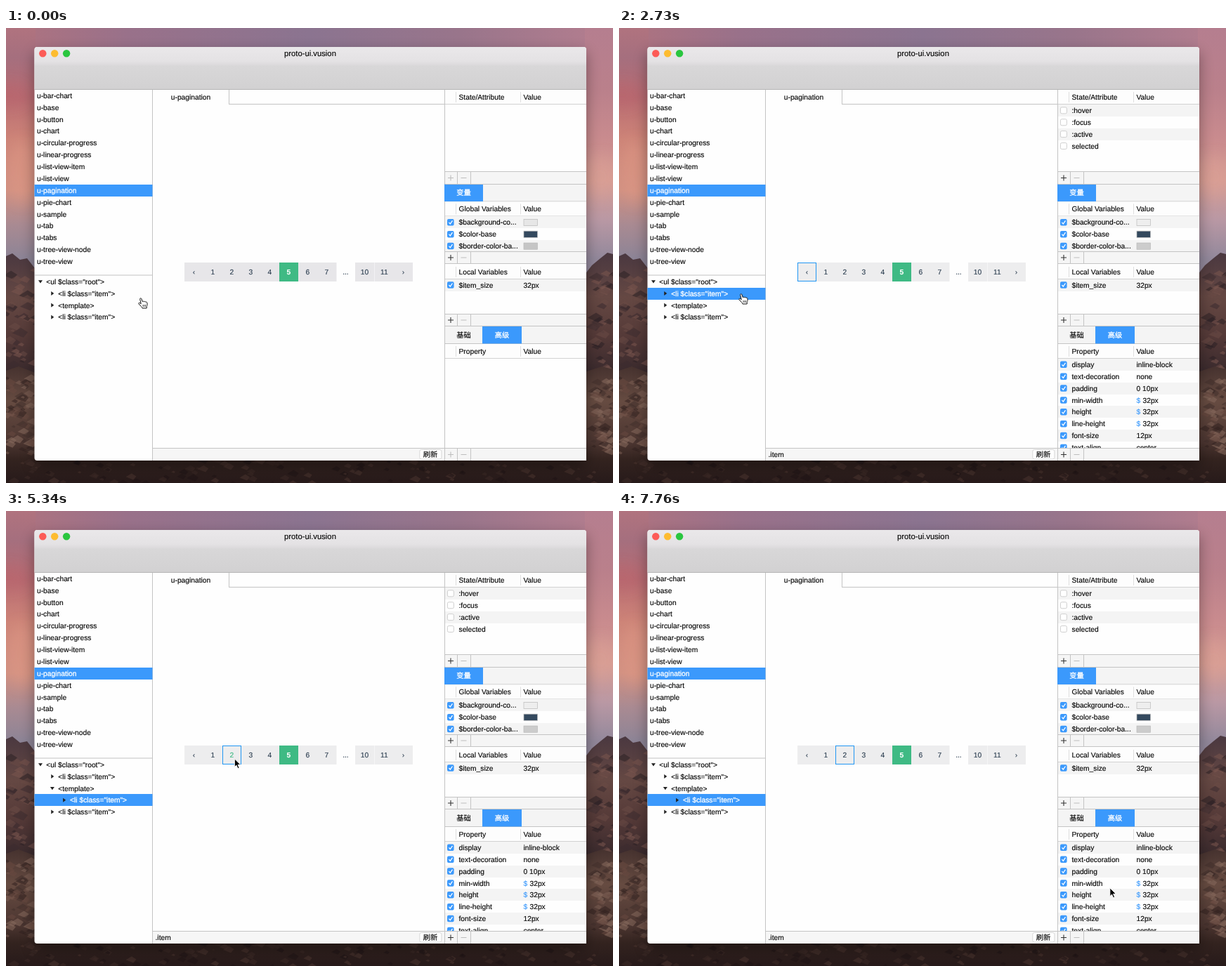
Animation of 864 by 648 pixels, one loop 8 s. Source, as an HTML page:

```html
<!DOCTYPE html>
<html lang="zh">
<head>
<meta charset="utf-8">
<title>proto-ui.vusion</title>
<style>
html, body { margin: 0; width: 100%; height: 100%; overflow: hidden; background: #2a1c1d; }
svg { display: block; width: 864px; height: 648px; }
text {
  font: 10.25px "Liberation Sans", Arial, "Noto Sans CJK SC", "Noto Sans CJK", sans-serif;
  color: #050505; fill: currentColor; stroke: currentColor; stroke-width: .14px;
  white-space: pre; text-rendering: geometricPrecision;
}
.cjk { font-family: "Noto Sans CJK SC", "Noto Sans CJK", sans-serif; font-weight: 500; }
.mid { text-anchor: middle; }
.on { color: #fff; stroke-width: .3px; }
</style>
</head>
<body>
<svg id="stage" viewBox="0 0 864 648" xmlns="http://www.w3.org/2000/svg"></svg>
<script>
const LOOP = 8000, ROW = 16.875;
const BLUE = '#3b99fc', STRIPE = '#f4f4f4', LINE = '#c4c4c4', GREEN = '#3fba84', INK = '#2c3e50';

// ---------- helpers ----------
const esc = s => s.replace(/&/g, '&amp;').replace(/</g, '&lt;');
const rect = (x, y, w, h, fill, extra = '') =>
  `<rect x="${x}" y="${y}" width="${w}" height="${h}" fill="${fill}" ${extra}/>`;
const hline = (x1, x2, y, c = LINE) => rect(x1, y, x2 - x1, 1, c);
const vline = (x, y1, y2, c = LINE) => rect(x, y1, 1, y2 - y1, c);
const path = (d, fill, extra = '') => `<path d="${d}" fill="${fill}" ${extra}/>`;
// y is the middle of the text line
const text = (x, y, s, cls = '', style = '') =>
  `<text x="${x}" y="${y + 3.6}" class="${cls}" style="${style}">${esc(s)}</text>`;
// Row background on whole pixels around the middle y
const band = (x, y, w, fill) => rect(x, Math.round(y - 8.4), w, 17, fill);
const clip = (id, x, y, w, h) => `<clipPath id="${id}">${rect(x, y, w, h, '#000')}</clipPath>`;
const gradient = (id, stops, dir = 'x2="0" y2="1"') =>
  `<linearGradient id="${id}" ${dir}>` +
  stops.map(([o, c]) => `<stop offset="${o}" stop-color="${c}"/>`).join('') + '</linearGradient>';

let seed = 11;
const rand = () => (seed = (seed * 16807) % 2147483647) / 2147483647;

// ---------- desktop ----------
function rocks(n, x, y, w, h, colors, size) {
  let out = '';
  for (let i = 0; i < n; i++) {
    const px = x + rand() * w, py = y + rand() * h, s = size * (.4 + rand());
    const d = `M${px.toFixed(1)} ${py.toFixed(1)}l${s.toFixed(1)} ${(-s * .6).toFixed(1)}` +
      `l${(s * .8).toFixed(1)} ${(s * .5).toFixed(1)}l${(-s * .5).toFixed(1)} ${(s * .6).toFixed(1)}z`;
    out += path(d, colors[i % colors.length], 'opacity=".55"');
  }
  return out;
}

function desktop() {
  const dark = ['#2c2024', '#6a4a45', '#3d2c30', '#7a564e'];
  const boulders = ['#7c5f54', '#32211f', '#68493f', '#42302b', '#866a5d'];
  return rect(0, 0, 864, 60, 'url(#skyTop)') + rect(0, 0, 42, 350, 'url(#skyL)') +
    rect(824, 0, 40, 350, 'url(#skyR)') +
    `<g filter="url(#soft)">
      <ellipse cx="4" cy="95" rx="26" ry="16" fill="#b9636d" opacity=".5"/>
      <ellipse cx="24" cy="205" rx="24" ry="44" fill="#e09a86" opacity=".45"/>
      <ellipse cx="846" cy="212" rx="28" ry="30" fill="#dea396" opacity=".4"/>
    </g>` +
    path('M0 325L9 321L20 330L30 328L44 346V500H0Z', 'url(#peak)') +
    path('M820 356L834 338L846 328L856 320L864 322V500H820Z', 'url(#peak)') +
    rocks(45, -6, 345, 46, 140, dark, 9) + rocks(45, 824, 350, 44, 135, dark, 9) +
    path('M0 488L18 482L44 492L432 500L824 490L848 482L864 486V648H0Z', 'url(#ground)') +
    rocks(70, -6, 498, 48, 110, boulders, 8) + rocks(70, 824, 498, 44, 110, boulders, 8) +
    rocks(130, -6, 616, 876, 34, ['#3d2a27', '#1f1415', '#4a342f'], 7);
}

// ---------- window parts ----------
function toolBar(y, h, enabled) {
  const m = y + h / 2 + .5, end = y + h;
  return rect(625, y, 201, h, '#f5f5f5') + hline(625, 826, y) + (end < 616 ? hline(625, 826, end) : '') +
    vline(642, y, end) + vline(661, y, end) + plus(m, enabled) +
    rect(647.5, m - .5, 8, 1, '#bdbdbd');
}
const plus = (m, enabled) => path(`M629 ${m}h8M633 ${m - 4}v8`, 'none',
  `stroke="${enabled ? '#333' : '#bdbdbd'}" stroke-width="1.1"`);

const header = (y, title) => rect(625, y - 10, 201, 20, '#fdfdfd') + hline(625, 826, y + 10, '#d2d2d2') +
  vline(640, y - 7, y + 8, '#dedede') + vline(732, y - 7, y + 8, '#dedede') +
  text(644.5, y, title) + text(736.5, y, 'Value');

// Tab strip with the chosen tab from x on, w wide
const tabBar = (y, x, w) => rect(625, y, 201, 24, '#f4f4f4') + hline(625, 826, y + 24) +
  rect(x, y, w, 24.5, BLUE);
const tabText = (x, y, s, on) => text(x, y, s, 'cjk mid' + (on ? ' on' : ''));

const check = (y, on) => on
  ? rect(628, y - 4.8, 9.6, 9.6, BLUE, 'rx="2"') +
    path(`M630.4 ${y}l1.9 2.2l3.2 -4.7`, 'none', 'stroke="#fff" stroke-width="1.3"')
  : rect(628.4, y - 4.4, 9, 9, '#fff', 'rx="2" stroke="#cacaca" stroke-width=".9"');

// A value starting with $ shows the sign in blue
function rows(y0, items, checked) {
  return items.map(([name, value = ''], i) => {
    const y = y0 + i * ROW;
    const linked = value[0] === '$';
    return (i % 2 ? '' : band(625, y, 201, STRIPE)) + check(y, checked) +
      text(644.5, y, name) +
      (linked ? text(736.5, y, '$', '', `color:${BLUE}`) + text(745.5, y, value.slice(2)) : text(736.5, y, value));
  }).join('');
}

const parts = ['u-bar-chart', 'u-base', 'u-button', 'u-chart', 'u-circular-progress', 'u-linear-progress',
  'u-list-view-item', 'u-list-view', 'u-pagination', 'u-pie-chart', 'u-sample', 'u-tab', 'u-tabs',
  'u-tree-view-node', 'u-tree-view'];

function frame() {
  const list = parts.map((p, i) => {
    const y = 96.2 + i * ROW, on = p === 'u-pagination';
    return (on ? band(40.5, y, 168, BLUE) : '') + text(44, y, p, on ? 'on' : '');
  }).join('');
  const lights = ['#fc5b57', '#fdbc30', '#2ac63f'].map((c, i) =>
    `<circle cx="${52.3 + 16.9 * i}" cy="36.2" r="5.2" fill="${c}"/>`).join('');
  return rect(40.5, 27, 785.5, 589, '#000', 'rx="4" filter="url(#shadow)" opacity=".36"') +
    rect(40.5, 27, 785.5, 589, '#fefefe', 'rx="4"') +
    path('M40.5 87V31q0 -4 4 -4H822q4 0 4 4V87Z', 'url(#bar)') + hline(40.5, 826, 87, '#b5b5b5') +
    lights + text(433, 36.7, 'proto-ui.vusion', 'mid', 'font-size:11.25px') +
    hline(41, 208, 351.5) + vline(208, 88, 616) + list +
    text(263, 98, 'u-pagination', 'mid') + vline(317, 88, 109) + hline(317, 624, 108) +
    rect(209, 599, 415, 17, '#f6f6f6') + hline(209, 624, 598) +
    rect(588.8, 600.5, 31, 13.5, '#fff', 'rx="2.5" stroke="#d0d0d0" stroke-width=".8"') +
    text(604, 607.4, '刷新', 'cjk mid') + vline(624, 88, 616);
}

function sidebar() {
  return header(98, 'State/Attribute') +
    tabBar(222.5, 624, 55) + tabText(651.5, 234.7, '变量', true) + header(257.4, 'Global Variables') +
    `<g clip-path="url(#cGlobal)">${rows(276.8, [['$background-co...'], ['$color-base'], ['$border-color-ba...']], true)}</g>` +
    '<g id="swatches"></g>' + toolBar(318, 17, true) +
    header(347, 'Local Variables') + rows(366, [['$item_size', '32px']], true) + toolBar(407, 17, true) +
    tabBar(425, 678, 56) + tabText(651.5, 437, '基础', false) + tabText(706, 437, '高级', true) +
    header(460, 'Property');
}

// ---------- changing parts ----------
const states = [[':hover'], [':focus'], [':active'], ['selected']];
const rootProps = [['user-select', 'none'], ['cursor', 'default'], ['padding', '0'], ['margin-bottom', '$ 15px']];
const itemProps = [['display', 'inline-block'], ['text-decoration', 'none'], ['padding', '0 10px'],
  ['min-width', '$ 32px'], ['height', '$ 32px'], ['line-height', '$ 32px'], ['font-size', '12px'],
  ['text-align', 'center']];

const LI = '<li $class="item">';
const tree = [[0, '<ul $class="root">', 1], [1, LI, 0], [1, '<template>', 0], [1, LI, 0]];
const openTree = [tree[0], tree[1], [1, '<template>', 1], [2, LI, 0], tree[3]];

function drawTree(nodes, picked, hover) {
  return nodes.map(([depth, label, open], i) => {
    const y = 361.2 + i * ROW, x = 49 + depth * ROW, on = i === picked;
    const fill = on ? BLUE : i === hover ? STRIPE : '';
    const arrow = open ? `M${x - 3} ${y - 2}h6l-3 4.4z` : `M${x - 1.6} ${y - 3.2}v6l4 -3z`;
    return (fill ? band(40.5, y, 168, fill) : '') +
      path(arrow, '#222') + text(x + 8.3, y, label, on ? 'on' : '');
  }).join('');
}

const pages = ['‹', '1', '2', '3', '4', '5', '6', '7', '...', '10', '11', '›'];
const outline = (x, w) => rect(x + .5, 334.5, w - 1, 26, 'none', 'stroke="#2196f3"');

function drawPages(phase, hover) {
  const base = phase ? '#ededee' : '#e7e6e9';
  const cells = pages.map((p, i) => {
    const x = Math.round(254 + i * 27.05), active = p === '5';
    const bg = p === '...' ? '' : rect(x, 334, i < 11 ? 27.5 : 27, 27, active ? GREEN : base);
    const color = active ? '#fff;font-weight:bold' : i === hover ? GREEN : INK;
    return bg + text(x + 13.4, 347.6, p, 'mid', 'color:' + color);
  }).join('');
  const picked = [-1, -1, 0, 2][phase];
  return rect(470, 334, 27, 27, '#fefefe') + cells + (phase === 1 ? outline(254, 325) : '') +
    [...new Set([picked, hover])].filter(i => i >= 0).map(i => outline(254 + i * 27, 27)).join('');
}

const swatches = phase => [phase ? '#eeeeee' : '#e6e6e6', '#34495e', phase ? '#cccccc' : '#c5c5c5']
  .map((c, i) => rect(737, 272.3 + i * ROW, 19.5, 9.2, c, 'stroke="#b9b9b9" stroke-width=".7"')).join('');

// ---------- pointer ----------
// [first ms, last ms, [x, y]...]: positions spread evenly over the span, each held until the next
const moves = [
  [0, 0, [188, 384]], [90, 90, [188, 383]],
  [270, 580, [186, 378], [179, 371], [170, 366], [166, 364]],
  [1690, 1690, [165, 365]], [1860, 1860, [170, 378]], [3000, 3000, [234, 377]],
  [3150, 3880, [238, 375], [248, 370], [258, 364], [268, 359], [278, 355], [287, 353], [294, 353], [298, 354]],
  [4000, 4770, [320, 355], [340, 354], [354, 354], [358, 355], [350, 354], [336, 353], [328, 352], [325, 352.5]],
  [5780, 6130, [326, 368], [328, 405], [329, 440], [329.5, 454.5]],
  [6400, 6810, [350, 466], [395, 474], [440, 470], [478, 459], [492, 455]],
  [7260, 7760, [520, 463], [580, 487], [650, 518], [696, 536], [706, 536], [698.5, 536.5]]
];
const steps = moves.flatMap(([a, b, ...pts]) =>
  pts.map(([x, y], i) => ({ t: Math.round(a + (b - a) * i / Math.max(1, pts.length - 1)), x, y })));

const hand = path('M2.7 2.3C2.3 .7 4.4 .2 4.9 1.7L6.2 5.7C6.8 4.9 8.2 5.1 8.5 5.9C9.2 5.1 10.5 5.4 10.8 6.3' +
  'C11.8 5.8 12.7 6.4 12.9 7.5C13.3 9.6 13 11.3 12.2 12.6L12.2 15H5.9C5.8 13.8 4.8 13 3.9 12L1 8.9' +
  'C.2 7.8 1.5 6.8 2.6 7.6L4.2 8.8Z', '#fff', 'stroke="#111" stroke-width="1" stroke-linejoin="round"') +
  path('M7 10v3M8.8 10v3M10.6 10v3', 'none', 'stroke="#111" stroke-width=".7"');
const arrow = path('M.3 .3V12.2L3 9.7L5 14.3L7.1 13.4L5.1 8.9H8.9Z', '#000',
  'stroke="#fff" stroke-width="1" stroke-linejoin="miter"');

function pageAt({ t, x, y }) {
  if (t < 3000 || y < 334 || y > 361 || x < 254) return -1;
  const i = Math.floor((x - 254) / 27);
  return i < pages.length ? i : -1;
}

// ---------- build ----------
const stage = document.getElementById('stage');
stage.innerHTML = '<defs>' +
  gradient('skyTop', [[0, '#b0737f'], [.2, '#99718a'], [.5, '#8b7490'], [.75, '#99758b'], [1, '#b57e8f']], '') +
  gradient('skyL', [[0, '#b0737f'], [.12, '#a56f7e'], [.28, '#b86b72'], [.45, '#cd8478'], [.66, '#d09082'],
    [.8, '#a98a92'], [.94, '#8c8496']]) +
  gradient('skyR', [[0, '#b57e8f'], [.25, '#ba808b'], [.45, '#c98b8e'], [.62, '#d49b93'], [.78, '#b998a4'],
    [.94, '#92889b']]) +
  gradient('peak', [[0, '#4a3840'], [.35, '#654843'], [.65, '#553a38'], [1, '#35272b']]) +
  gradient('ground', [[0, '#46322f'], [.3, '#664b41'], [.65, '#4c3631'], [.8, '#33231f'], [1, '#271a1a']]) +
  gradient('bar', [[0, '#eae8ea'], [.34, '#e4e2e4'], [.46, '#d8d7d8'], [1, '#d2d1d2']]) +
  '<filter id="soft" x="-50%" y="-50%" width="200%" height="200%"><feGaussianBlur stdDeviation="9"/></filter>' +
  '<filter id="shadow" x="-10%" y="-10%" width="120%" height="125%"><feOffset dy="8"/><feGaussianBlur stdDeviation="10"/></filter>' +
  clip('cGlobal', 625, 268, 201, 50) + clip('cProps', 625, 471, 201, 127) +
  '</defs>' + desktop() + frame() + sidebar() +
  '<g id="tree"></g><g id="pages"></g><g id="props"></g><g id="pointer"></g>';

const el = id => document.getElementById(id);
const drawn = {};
// Rebuilds a group only when its key differs from the last one
function put(id, key, make) {
  if (drawn[id] === key) return;
  drawn[id] = key;
  el(id).innerHTML = make();
}

function render(t) {
  const phase = t < 1420 ? 0 : t < 2730 ? 1 : t < 5340 ? 2 : 3;
  let n = 0;
  while (n + 1 < steps.length && steps[n + 1].t <= t) n++;
  const now = steps[n];
  const under = pageAt(n ? steps[n - 1] : now);   // hover trails the pointer by one step
  const row = t < 90 ? -1 : t < 373 ? 1 : t < 1420 ? 0 : t >= 1860 && t < 2730 ? 1 : -1;

  put('tree', phase + ':' + row, () =>
    drawTree(phase === 3 ? openTree : tree, [-1, 0, 1, 3][phase], row));
  put('pages', phase + ':' + under, () => drawPages(phase, under));
  put('swatches', phase > 0, () => swatches(phase));
  put('props', phase, () => {
    const items = [[], rootProps, itemProps, itemProps][phase];
    return (phase ? rows(117.3, states, false) : '') +
      `<g clip-path="url(#cProps)">${rows(479.3, items, true)}</g>` +
      toolBar(204, 18, phase > 0) + toolBar(598, 18, phase > 0) +
      (phase ? text(212.5, 607.4, phase === 1 ? '.root' : '.item') : '');
  });
  put('pointer', t < 3000, () => t < 3000 ? hand : arrow);
  el('pointer').setAttribute('transform', `translate(${now.x} ${now.y})`);
}

const start = performance.now();
function tick() {
  render((performance.now() - start) % LOOP);
  requestAnimationFrame(tick);
}
tick();
</script>
</body>
</html>
```
